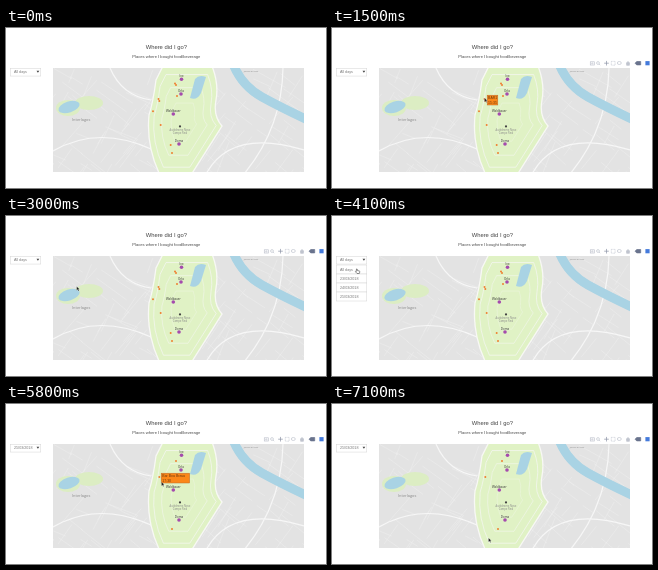
These frames come from a looping animation (320 by 160 pixels, 7200 ms). An HTML page:

```html
<!DOCTYPE html>
<html lang="en">
<head>
<meta charset="utf-8">
<title>Where did I go?</title>
<style>
html, body { margin: 0; width: 100%; height: 100%; overflow: hidden; background: #fff; }
svg { display: block; width: 100vw; height: 100vh; }
text { font-family: "Liberation Sans", Arial, sans-serif; fill: #444; }
.mid { text-anchor: middle; }
.map text { font-family: "Open Sans", sans-serif; fill: #888; }
.map .place { font-size: 2.9px; fill: #333; }
.field { font-size: 3.7px; fill: #777; }
.box { fill: #fff; stroke: #d4d4d4; stroke-width: .5; }
.tip text { font-size: 3.5px; fill: #6b3a10; }
.tip rect { fill: #fb8719; stroke: #b9692a; stroke-width: .5; }
.tools { fill: none; stroke: #c0c4ce; stroke-width: .7; }
.water { fill: #a9d3e4; }
.roads { fill: none; stroke: #f7f7f7; }
</style>
</head>
<body>
<svg viewBox="0 0 320 160">
  <defs>
    <clipPath id="frame"><rect x="47" y="40" width="251" height="104"/></clipPath>
    <path id="park" d="M157 38L150 52Q147 75 143 87Q140 118 154 147H185L216 98Q207 88 210 72T206 38Z"/>
  </defs>

  <text class="mid" x="160.3" y="21" font-size="5.85">Where did I go?</text>
  <text class="mid" x="160.3" y="29.6" font-size="4.12">Places where I bought food/beverage</text>

  <g class="map" clip-path="url(#frame)">
    <rect x="47" y="40" width="251" height="104" fill="#e3e3e3"/>
    <path class="roads" id="streets" stroke-width=".4" opacity=".7"/>
    <ellipse cx="83" cy="75" rx="14" ry="7" fill="#dcedc3"/>
    <ellipse cx="62" cy="80" rx="12" ry="8" fill="#dcedc3"/>
    <ellipse class="water" cx="63" cy="79" rx="11" ry="5.5" transform="rotate(-18 63 79)"/>
    <path class="roads" stroke-width="1.2" d="M47 123Q92 97 145 121M104 40Q116 68 145 72M277 40Q276 100 238 146M200 146Q225 100 298 122"/>
    <path d="M227 36Q236 58 256 69T304 93" fill="none" stroke="#a9d3e4" stroke-width="9"/>
    <use href="#park" fill="#e0f2c5" stroke="#f8f8f5" stroke-width="1.3"/>
    <g id="tracks" class="roads" stroke-width=".8"></g>
    <path class="water" d="M189 51Q193 46 200 49L195 65Q191 73 184 70Z"/>
    <text x="66" y="93.3" font-size="3.95">Interlagos</text>
    <text class="mid" x="245" y="44" font-size="2.2">Jardim do Vale</text>
    <text class="mid" x="174" y="103" font-size="2.6">Autódromo Novo</text>
    <text class="mid" x="174" y="106.3" font-size="2.6">Campo Real</text>
    <circle cx="174" cy="98.4" r="1.1" fill="#444"/>
    <g id="shops" fill="#ef7f31"></g>
    <g id="stages" fill="#a44bad"></g>
  </g>

  <g class="tools" id="tools">
    <rect x="258.3" y="33.8" width="4" height="3.2"/>
    <circle cx="260.3" cy="35.4" r=".6"/>
    <circle cx="266" cy="35" r="1.4"/>
    <path d="M267 36l1.2 1.2"/>
    <path d="M272.2 35.2h4.6M274.5 32.9v4.6" stroke="#8d94a6"/>
    <rect x="279.3" y="33.4" width="3.8" height="3.8" stroke-dasharray=".8 .5"/>
    <ellipse cx="287.3" cy="35" rx="2" ry="1.5"/>
    <path d="M294 35.4l2-1.9 2 1.9h-.6v1.9h-2.8v-1.9z" fill="#c0c4ce"/>
    <path d="M303.1 35.2l1.6-1.7h4v3.4h-4z" fill="#69738d" stroke="#69738d"/>
    <rect x="313.4" y="33.1" width="4.2" height="4.2" fill="#447adb" stroke="none"/>
  </g>

  <rect class="box" x="4.25" y="40.25" width="30.5" height="7.8"/>
  <text class="field" id="choice" x="8" y="45.4"></text>
  <path d="M30.5 42.7h2.8l-1.4 2z" fill="#444"/>
  <g id="list"></g>

  <g class="tip" id="tipA">
    <rect x="155.2" y="67.2" width="10.6" height="9.8"/>
    <text x="156.1" y="71.3">BAR1</text><text x="156.1" y="75.8">15:35</text>
  </g>
  <g class="tip" id="tipB">
    <rect x="155.2" y="69.2" width="28.4" height="9.8"/>
    <text x="156.3" y="73.3">Bar Boa Brasa</text><text x="156.3" y="77.7">17:30</text>
  </g>

  <g id="cursor">
    <path id="arrow" d="M0 0v3.9l.9-.8.7 1.5.8-.4-.7-1.4h1.2z" fill="#111" stroke="#fff" stroke-width=".25"/>
    <path id="hand" d="M0 0q.6-.5.9.2v1.3l2 .5q.6.2.4 1l-.5 1.5h-2.3l-1.6-1.8q0-.8.9-.2z" fill="#fff" stroke="#222" stroke-width=".5"/>
  </g>
</svg>
<script>
const LOOP = 7200;
const $ = id => document.getElementById(id);

function add(parent, tag, attrs, text = "") {
  const el = document.createElementNS("http://www.w3.org/2000/svg", tag);
  for (const key in attrs) el.setAttribute(key, attrs[key]);
  el.textContent = text;
  return $(parent).appendChild(el);
}

const show = (id, on) => $(id).setAttribute("visibility", on ? "visible" : "hidden");

let seed = 7;
const random = () => (seed = seed * 16807 % 2147483647) / 2147483647;

// short streets in two crossing directions
let streets = "";
for (let i = 0; i < 110; i++) {
  const angle = 0.35 + i % 2 * Math.PI / 2 + random() * 0.4;
  const length = 12 + random() * 28;
  streets += `M${47 + random() * 251} ${40 + random() * 104}l${length * Math.cos(angle)} ${length * Math.sin(angle)}`;
}
$("streets").setAttribute("d", streets);

// park lanes repeat its outline, shrinking towards the middle
for (const scale of [0.85, 0.62, 0.35]) {
  add("tracks", "use", { href: "#park", transform: `translate(177 95) scale(${scale}) translate(-177 -95)` });
}

const shops = [[170, 57], [153.3, 73], [166, 125], [169, 55.5], [171, 68], [152.5, 71], [147, 83.3], [154.7, 97], [164.7, 117]]
  .map(([cx, cy]) => add("shops", "circle", { cx, cy, r: 1 }));
const KEPT = 3; // the first shops belong to the chosen day

for (const [x, y, name] of [[175.5, 51.3, "Ivo"], [175, 66, "Orla"], [167.3, 86, "Waldbauer"], [173, 116, "Dorna"]]) {
  add("stages", "circle", { cx: x, cy: y, r: 1.8 });
  add("stages", "text", { class: "mid place", x, y: y - 2.3 }, name);
}

["All days", "23/03/2018", "24/03/2018", "25/03/2018"].forEach((label, i) => {
  const y = 49 + i * 9;
  add("list", "rect", { class: "box", x: 4.25, y, width: 30.5, height: 9 });
  add("list", "text", { class: "field", x: 8, y: y + 6.3 }, label);
});

// cursor rests: arrive, leave, x, y
const rests = [[0, 100, 244, 140], [1350, 1650, 152.5, 70], [2400, 3000, 70.7, 70.5], [3200, 3400, 27, 56],
  [3700, 3900, 30, 43], [4100, 4100, 24.5, 53], [4300, 4450, 24.5, 80], [5200, 5300, 162, 88.5],
  [5650, 6050, 155.5, 78], [6900, LOOP, 156.5, 134]];

function cursorAt(t) {
  const i = rests.findIndex(r => t <= r[1]);
  const [arrive, , x, y] = rests[i];
  if (t >= arrive) return [x, y];
  const [, leave, x0, y0] = rests[i - 1];
  const u = (t - leave) / (arrive - leave), e = u * u * (3 - 2 * u);
  return [x0 + (x - x0) * e, y0 + (y - y0) * e];
}

function draw() {
  const t = performance.now() % LOOP;
  const within = (from, to = LOOP) => t >= from && t < to;
  const chosen = within(4500), hand = within(3700, 4600);
  $("cursor").setAttribute("transform", `translate(${cursorAt(t)})`);
  show("arrow", within(100) && !hand);
  show("hand", hand);
  show("tools", within(900));
  show("list", within(3900, 4500));
  show("tipA", within(1300, 1700));
  show("tipB", within(5600, 6100));
  $("choice").textContent = chosen ? "25/03/2018" : "All days";
  shops.forEach((shop, i) => shop.setAttribute("opacity", chosen && i >= KEPT ? 0 : 1));
  requestAnimationFrame(draw);
}
draw();
</script>
</body>
</html>
```
